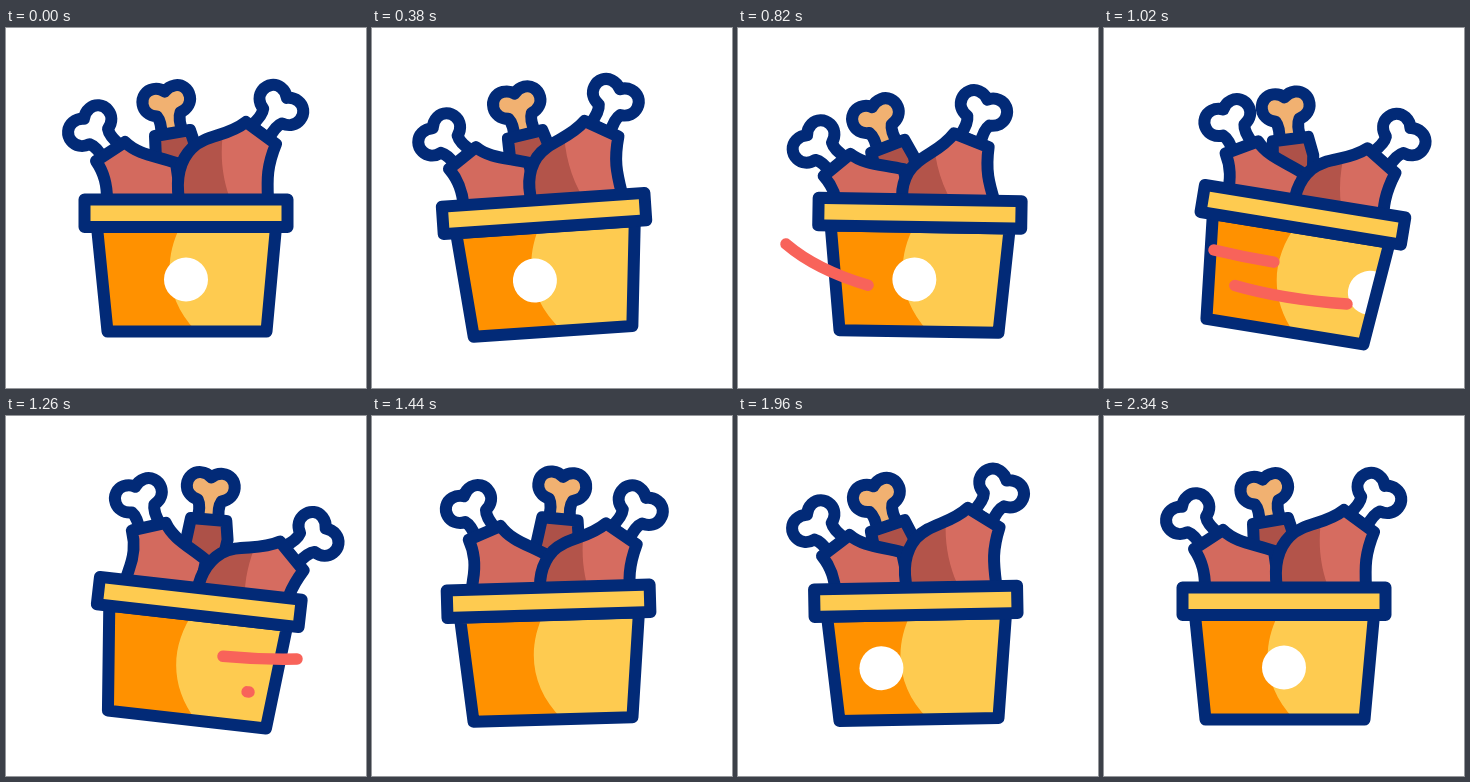
Recreate the animation shown at these times as an HTML page. Size 360 px wide and 360 px high, loop 2.4 s.

```html
<!DOCTYPE html>
<html>
<head>
<meta charset="utf-8">
<title>Chicken bucket</title>
<style>
html, body { margin: 0; width: 100%; height: 100%; overflow: hidden; background: #fff; }
svg { display: block; width: 100vw; height: 100vh; }
.ink { stroke: #022a77; stroke-width: 12; stroke-linejoin: round; stroke-linecap: round; }
.streak { fill: none; stroke: #f8635a; stroke-width: 11.5; stroke-linecap: round; }
</style>
</head>
<body>
<svg viewBox="0 0 360 360">
  <defs>
    <path id="bone" d="M-11 2C-9-8-9-14-12-19C-20-21-24-27-24-33C-24-41-18-46.5-11-46.5C-6-46.5-3-45 0-42C3-45 6-46.5 11-46.5C18-46.5 24-41 24-33C24-27 20-21 12-19C9-14 9-8 11 2Z"/>
    <path id="tub" d="M91 199L101.500 303.500H260.500L270 199Z"/>
    <path id="breast" d="M240 94C221 109 201 106 186 120C173 133 170 152 173 172L176 205H260L262 172C261 150 261 138 270 116Z"/>
    <clipPath id="tubClip"><use href="#tub"/></clipPath>
    <clipPath id="breastClip"><use href="#breast"/></clipPath>
  </defs>
  <g id="bucket">
    <g id="back">
      <use href="#bone" class="ink" fill="#f1b171" transform="translate(166 105) rotate(-10)"/>
      <path class="ink" fill="#ad5148" d="M149 108L184 102L190 120L192 205H150V132Z"/>
    </g>
    <g id="left">
      <use href="#bone" class="ink" fill="#fff" transform="translate(105 123) rotate(-40)"/>
      <path class="ink" fill="#d36a5e" d="M90 133L119 114C132 127 151 128 170 135L180 205H102L101 172C101 158 99 146 90 133Z"/>
    </g>
    <g id="right">
      <use href="#bone" class="ink" fill="#fff" transform="translate(255 103) rotate(38)"/>
      <use href="#breast" fill="#d66c60"/>
      <path clip-path="url(#breastClip)" fill="#b3544a" d="M160 90H220C213 118 215 145 223 168L230 205H160Z"/>
      <use href="#breast" class="ink" fill="none"/>
    </g>
    <use href="#tub" fill="#fecb50"/>
    <g clip-path="url(#tubClip)">
      <path fill="#ff9100" d="M80 195H176C156 232 160 272 190 303H80Z"/>
      <circle id="badge" cy="251.500" r="22" fill="#fff"/>
    </g>
    <use href="#tub" class="ink" fill="none"/>
    <rect class="ink" x="78.500" y="171.500" width="203" height="27.500" fill="#fecb50"/>
  </g>
  <path id="low" class="streak" pathLength="1" d="M48 216C90 252 160 270 243 276"/>
  <path id="high" class="streak" pathLength="1" d="M110 222Q205 245 291 243"/>
</svg>
<script>
const LOOP = 2400, END = 2340;
const el = id => document.getElementById(id);
const span = (t, a, b) => Math.min(1, Math.max(0, (t - a) / (b - a)));

// Cosine swing through [time, value] turning points, at rest before and after
function swing(t, ...points) {
  let value = 0, from = 0;
  for (const [to, next] of points) {
    if (t < from) break;
    const ease = t >= to ? 1 : (1 - Math.cos(Math.PI * span(t, from, to))) / 2;
    value += (next - value) * ease;
    from = to;
  }
  return value;
}

function pose(id, turn, pivot, bob = 0) {
  el(id).setAttribute("transform", `translate(0 ${bob}) rotate(${turn} ${pivot})`);
}

function trim(id, head, tail) {
  const s = el(id).style;
  s.display = head > 0 && tail < 1 ? "" : "none";
  s.strokeDasharray = Math.max(0.002, head - tail) + " 3";
  s.strokeDashoffset = -Math.min(tail, 0.998);
}

function draw(t) {
  const bob = swing(t, [380, 0], [820, 11], [1380, -5], [1960, 3], [END, 0]);
  const dip = swing(t, [1240, 18], [2000, 0]);
  pose("bucket", swing(t, [130, 0], [580, -6.6], [1090, 10], [1660, -7.3], [2060, 0]), "180 303");
  pose("back", swing(t, [380, 0], [820, -12], [1540, 18], [1960, -8], [END, 0]), "170 200", bob);
  pose("left", swing(t, [200, 0], [760, -8], [1260, 14], [1960, -3], [END, 0]), "130 190", bob);
  pose("right", swing(t, [780, -16], [1260, 8], [1600, -7], [END, 0]), "217 192", dip);

  // The badge leaves on the right and comes back from the left
  const spin = t < 1200 ? swing(t, [700, -24], [1200, 120])
    : swing(t - 1620, [0, -125], [530, 0]);
  el("badge").setAttribute("cx", 180 + (t >= 1200 && t < 1620 ? -125 : spin));

  trim("low", span(t, 675, 1000), span(t, 820, 1264));
  trim("high", span(t, 930, 1200), span(t, 1070, 1390));
}

const start = performance.now();
function tick() {
  const t = (performance.now() - start) % LOOP;
  draw(Math.min(END, Math.floor(t / 20) * 20));
  requestAnimationFrame(tick);
}
draw(0);
requestAnimationFrame(tick);
</script>
</body>
</html>
```
